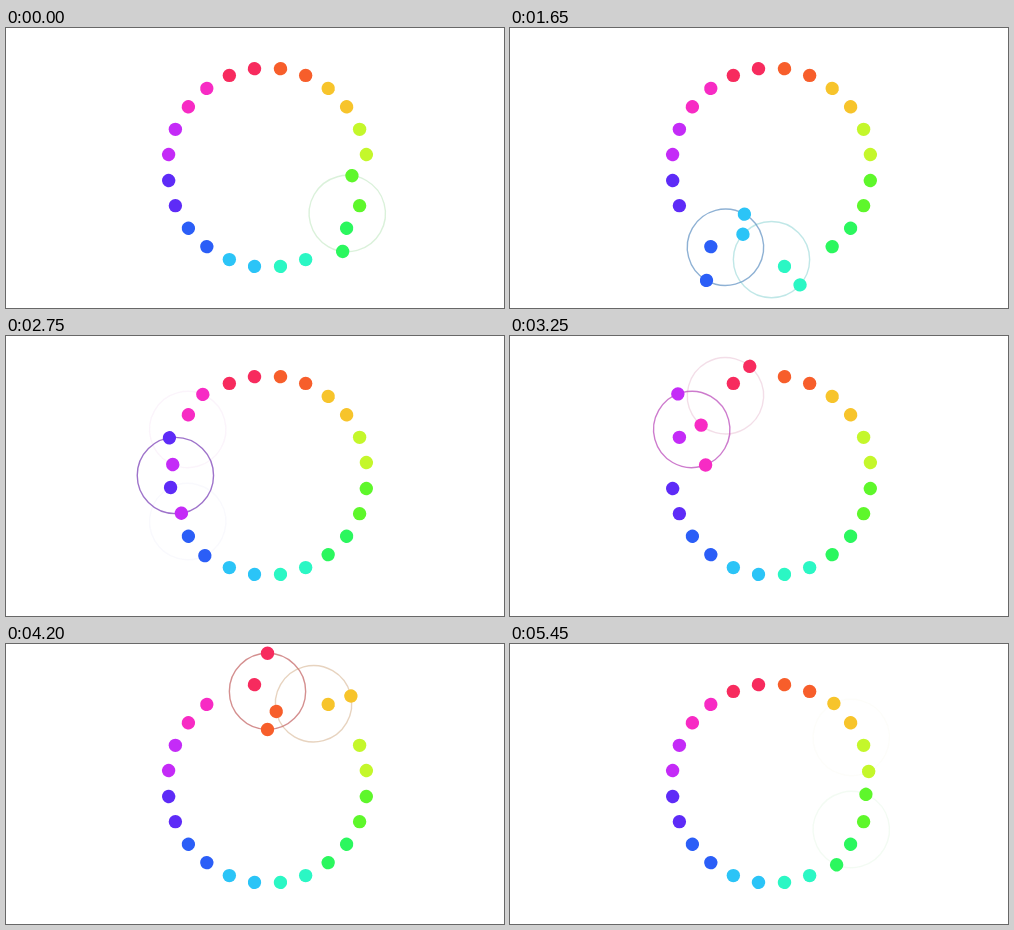
Animation of 498x280 px, one loop 5.5 s. Source, as an HTML page:

```html
<!DOCTYPE html>
<html lang="en">
<head>
<meta charset="utf-8">
<title>Swapping dots</title>
<style>
  html, body { margin: 0; width: 100%; height: 100%; overflow: hidden; background: #fff; }
  svg { display: block; width: 100vw; height: 100vh; }
</style>
</head>
<body>
<svg id="stage" viewBox="0 0 498 280"></svg>
<script>
const LOOP = 5500, STEP = 50;
const RING = 99.7, DOT = 6.7, COUNT = 12;
const SPREAD = 22.5 * Math.PI / 180;
const ORBIT = RING * Math.sin(SPREAD);
const HUB = RING * Math.cos(SPREAD);
const SPAN = 2.4; // length of one turn, measured in staggers

// Loop time in ms against the turn that is at its midpoint.
const PACE = [
  [0, -0.774], [750, 0.632], [1650, 2.632], [2750, 5.035], [3750, 7.369],
  [4650, 9.369], [4800, 9.62], [5450, 11.045], [5500, 11.226]
];

const clamp = v => Math.min(1, Math.max(0, v));

// cubic-bezier(.42, 0, .58, 1)
function easeInOut(x) {
  let lo = 0, hi = 1;
  for (let n = 0; n < 24; n++) {
    const p = (lo + hi) / 2, q = 1 - p;
    if (1.26 * q * q * p + 1.74 * q * p * p + p * p * p < x) lo = p; else hi = p;
  }
  return lo * lo * (3 - 2 * lo);
}

function paceAt(t) {
  const k = PACE.findIndex(([end]) => t < end);
  const [t0, v0] = PACE[k - 1], [t1, v1] = PACE[k];
  return v0 + (v1 - v0) * (t - t0) / (t1 - t0);
}

function add(parent, name, attrs) {
  const node = document.createElementNS("http://www.w3.org/2000/svg", name);
  for (const key in attrs) node.setAttribute(key, attrs[key]);
  return parent.appendChild(node);
}

const root = add(document.getElementById("stage"), "g", { transform: "translate(261.5 139.5)" });
const orbits = add(root, "g", {});
const dots = add(root, "g", {});

const turns = Array.from({ length: COUNT }, (_, i) => {
  const place = `rotate(${30 * (i + 1)}) translate(${HUB} 0)`;
  const hue = 105 + 30 * i;
  const orbit = add(orbits, "circle", {
    r: ORBIT, transform: place, fill: "none",
    stroke: `hsl(${hue + 15} 45% 58%)`, "stroke-width": 1.4, opacity: 0
  });
  const pair = add(dots, "g", { transform: place });
  add(pair, "circle", { cy: -ORBIT, r: DOT, fill: `hsl(${hue} 93% 57%)` });
  add(pair, "circle", { cy: ORBIT, r: DOT, fill: `hsl(${hue + 30} 93% 57%)` });
  return { place, orbit, pair };
});

function draw(now) {
  const pace = paceAt(Math.floor((now % LOOP) / STEP) * STEP);
  // The last pair, on the right, stays at rest.
  turns.slice(0, -1).forEach(({ place, orbit, pair }, i) => {
    const offset = (pace - i + 1.5 * COUNT) % COUNT - COUNT / 2;
    const x = clamp(0.5 + offset / SPAN);
    pair.setAttribute("transform", `${place} rotate(${-360 * easeInOut(x)})`);
    orbit.setAttribute("opacity", 0.9 * easeInOut(1 - Math.abs(2 * x - 1)));
  });
}

function tick(now) {
  draw(now);
  requestAnimationFrame(tick);
}
draw(0);
requestAnimationFrame(tick);
</script>
</body>
</html>
```
